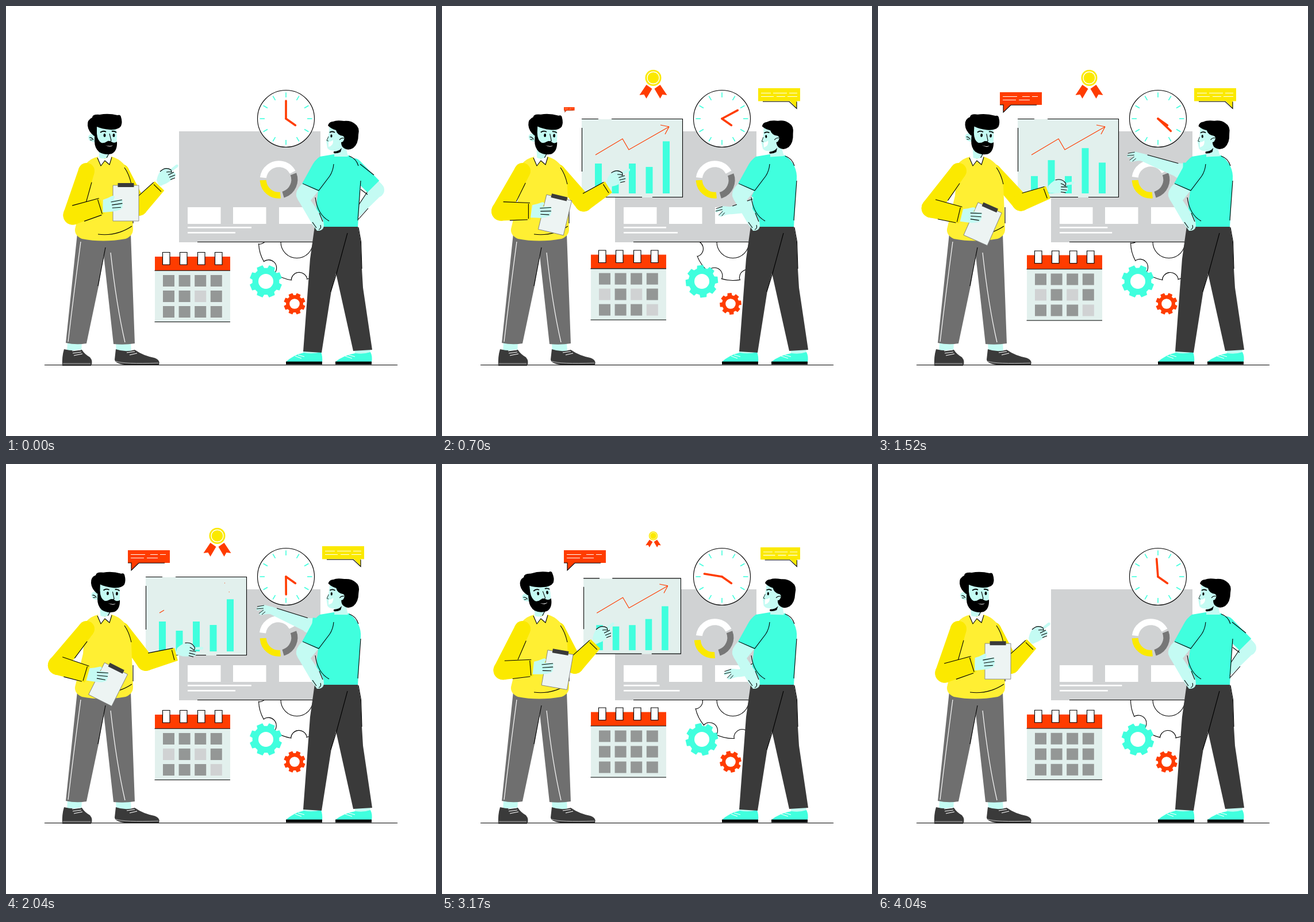
Recreate the animation shown at these times as an HTML page with a canvas. Size 748 by 748 pixels, loop 4090 ms.

```html
<!DOCTYPE html>
<html lang="en">
<head>
<meta charset="utf-8">
<title>Planning meeting</title>
<style>
html, body { margin: 0; width: 100%; height: 100%; overflow: hidden; background: #fff; }
canvas { display: block; width: 748px; height: 748px; }
</style>
</head>
<body>
<canvas id="stage" width="748" height="748"></canvas>
<script>
const ctx = document.getElementById('stage').getContext('2d');
const LOOP = 4090, TAU = Math.PI * 2, RAD = Math.PI / 180;
const CYAN = '#40ffde', SKIN = '#c4fbf3', RED = '#ff3c00', YELLOW = '#fbe900',
  SWEATER = '#ffef33', PAPER = '#e2f0ed', DARK = '#3a3a3a', GREY = '#6f6f6f', BOARD = '#d0d2d3';

const lerp = (a, b, p) => a + (b - a) * p;
const mix = (a, b, p) => [lerp(a[0], b[0], p), lerp(a[1], b[1], p)];
const ramp = (t, a, b) => {
  const p = Math.min(1, Math.max(0, (t - a) / (b - a)));
  return 0.5 - 0.5 * Math.cos(Math.PI * p);
};
const hump = (t, a, b) => t > a && t < b ? Math.sin(Math.PI * (t - a) / (b - a)) : 0;
const swing = t => 1 - Math.abs((t / LOOP * 2) % 1 * 2 - 1);

// Monotone cubic through rows of [time, ...values]
function key(t, rows) {
  let i = 0;
  while (i < rows.length - 2 && t >= rows[i + 1][0]) i++;
  const a = rows[i], b = rows[i + 1], span = b[0] - a[0], p = (t - a[0]) / span;
  const slope = (j, c) => {
    if (j < 1 || j > rows.length - 2) return 0;
    const [l, m, r] = [rows[j - 1], rows[j], rows[j + 1]];
    if ((m[c] - l[c]) * (r[c] - m[c]) <= 0) return 0;
    return (r[c] - l[c]) / (r[0] - l[0]);
  };
  return a.slice(1).map((v, k) => {
    const c = k + 1, q = p * p, u = q * p;
    return v * (2 * u - 3 * q + 1) + b[c] * (3 * q - 2 * u) +
      span * (slope(i, c) * (u - 2 * q + p) + slope(i + 1, c) * (u - q));
  });
}

function fill(d, color) {
  ctx.fillStyle = color;
  ctx.fill(new Path2D(d));
}
function line(d, color = '#000', width = 1.1) {
  ctx.strokeStyle = color;
  ctx.lineWidth = width;
  ctx.stroke(new Path2D(d));
}
function rect(x, y, w, h, color) {
  ctx.fillStyle = color;
  ctx.fillRect(x, y, w, h);
}
function disc(x, y, r, color) {
  ctx.fillStyle = color;
  ctx.beginPath();
  ctx.arc(x, y, r, 0, TAU);
  ctx.fill();
}
function oval(x, y, rx, ry) {
  ctx.fillStyle = '#000';
  ctx.beginPath();
  ctx.ellipse(x, y, rx, ry, 0, 0, TAU);
  ctx.fill();
}
// Places the drawing's point (px, py) at (x, y)
function group(draw, x, y, scale = 1, turn = 0, px = x, py = y) {
  if (scale <= 0.01) return;
  ctx.save();
  ctx.translate(x, y);
  ctx.rotate(turn);
  ctx.scale(scale, scale);
  ctx.translate(-px, -py);
  draw();
  ctx.restore();
}

// Limbs: a tapered capsule and lines along or across it
function offset(a, b, ra, rb, p, side) {
  const dx = b[0] - a[0], dy = b[1] - a[1], len = Math.hypot(dx, dy) || 1;
  const r = lerp(ra, rb, p) * side, m = mix(a, b, p);
  return [m[0] + dy / len * r, m[1] - dx / len * r];
}
function limb(a, b, ra, rb, color, flat) {
  const pts = [[0, 1], [1, 1], [1, -1], [0, -1]].map(([p, s]) => offset(a, b, ra, rb, p, s));
  fill('M' + pts.map(p => p.join()).join('L') + 'Z', color);
  disc(a[0], a[1], ra, color);
  if (!flat) disc(b[0], b[1], rb, color);
}
function edge(a, b, ra, rb, from, to, side = 1) {
  line('M' + offset(a, b, ra, rb, from, side) + 'L' + offset(a, b, ra, rb, to, side));
}
function cuff(a, b, r, p) {
  line('M' + offset(a, b, r, r, p, 0.9) + 'L' + offset(a, b, r, r, p, -0.9));
}

function cog(x, y, root, tip, hole, turn, color) {
  ctx.fillStyle = color;
  ctx.beginPath();
  for (let i = 0; i < 8; i++) {
    const a = turn + i * TAU / 8;
    [[-0.27, root], [-0.19, tip], [0.19, tip], [0.27, root]].forEach(([d, r]) =>
      ctx.lineTo(x + r * Math.cos(a + d), y + r * Math.sin(a + d)));
  }
  ctx.closePath();
  ctx.fill();
  disc(x, y, hole, '#fff');
}

function gears(t) {
  const cx = 506, cy = 411, r = 66.5, step = TAU / 7, turn = 138 * RAD - 8 * step * t / LOOP;
  ctx.strokeStyle = '#000';
  ctx.lineWidth = 1.1;
  ctx.beginPath();
  for (let i = 0; i < 7; i++) {
    const a = turn + i * step;
    ctx.arc(cx + r * Math.cos(a), cy + r * Math.sin(a), 14, a - 1.68, a + 1.68, true);
    ctx.arc(cx, cy, r, a + 0.21, a + step - 0.21);
  }
  ctx.closePath();
  ctx.stroke();
  ctx.beginPath();
  ctx.arc(cx, cy - 0.5, 28, 0, TAU);
  ctx.stroke();
  const spin = TAU * t / LOOP + TAU / 16;
  cog(452, 479, 23.5, 28.5, 13, spin, CYAN);
  cog(502, 518, 15, 19, 8.8, spin, RED);
}

function board(t) {
  rect(301, 218, 246, 193, BOARD);
  line('M333,410.5H541');
  [316, 395, 475].forEach(x => rect(x, 350, 57.5, 29, '#fff'));
  const s = swing(t);
  rect(316, 384, 111 - 54 * s, 2.6, '#fff');
  rect(316, 393, 83 + 16 * s, 2.6, '#fff');
  const part = (from, to, push, color) => {
    const mid = (from + to) / 2 * RAD;
    ctx.strokeStyle = color;
    ctx.lineWidth = 11;
    ctx.beginPath();
    ctx.arc(474.5 + push * Math.cos(mid), 302 + push * Math.sin(mid), 27.3, from * RAD, to * RAD);
    ctx.stroke();
  };
  part(187, 332, 5 * hump(t, 1450, 2600), '#fff');
  part(-21, 74, 3 * hump(t, 150, 950), '#777');
  part(84, 178, 4.5 * hump(t, 2800, 3700), YELLOW);
}

function clock(t) {
  const x = 487, y = 196;
  disc(x, y, 49.5, '#fff');
  line('M536.5,196A49.5,49.5 0 1 1 437.5,196A49.5,49.5 0 1 1 536.5,196');
  const ray = (a, from, to, color, w) => {
    const s = Math.sin(a), c = -Math.cos(a);
    line(`M${x + s * from},${y + c * from}L${x + s * to},${y + c * to}`, color, w);
  };
  for (let i = 0; i < 12; i++) ray(i * TAU / 12, 37, 45.5, CYAN, 1.6);
  ctx.lineCap = 'round';
  ray(125 * RAD, 0, 20, RED, 3.6);
  ray(TAU * t / LOOP, 0, 31, RED, 3.6);
  ctx.lineCap = 'butt';
}

function calendar(t) {
  const light = { 6: t < 2950, 4: t > 700 && t < 2400, 11: t > 700 && t < 2400 };
  group(() => {
    rect(259, 460, 131, 90, PAPER);
    rect(259, 436, 131, 24, RED);
    line('M258.5,460.3H390M258.5,549.5H390');
    [272.5, 302.5, 333.5, 363.5].forEach(x => {
      rect(x, 428.5, 12.5, 21.5, '#fff');
      line(`M${x},428.5h12.5v21.5h-12.5z`);
    });
    for (let i = 0; i < 12; i++)
      rect(273 + i % 4 * 27.6, 468 + Math.floor(i / 4) * 27, 20, 20, light[i] ? BOARD : '#949796');
  }, 0, -5 * swing(t), 1, 0, 0, 0);
}

function trim(d, len, p) {
  if (p <= 0.005) return;
  ctx.setLineDash([len * p, 999]);
  line(d, RED, 1.2);
  ctx.setLineDash([]);
}
function chart(t) {
  const scale = ramp(t, 40, 440) - ramp(t, 3123, 3523);
  group(() => {
    rect(243, 197, 176, 136, PAPER);
    line('M243,196.5H272M295,196.5H418.5V332.5H366M348,332.5H262M243.5,212V288');
    const h = 39.5 + 12.5 * Math.cos(3 * TAU * (t / LOOP - 0.5));
    [h, 88 - h, h, 124 - 1.5 * h, 1.7 * h + 2.3].forEach((v, i) =>
      rect(266 + i * 29.5, 326 - v, 12, v, CYAN));
    const p = ramp(t, 60, 560) - ramp(t, 1560, 2130) + ramp(t, 2130, 2600);
    trim('M267,259L314,231L325,250L395,210', 157.5, p);
    trim('M380,207L395,210', 15.5, p);
    trim('M388,223L395,210', 15, p);
  }, 331, 265, scale);
}

function extras(t) {
  const medal = 1 - ramp(t, 2980, 3390), grow = ramp(t, 390, 700);
  group(() => {
    const splay = 4 * RAD * hump(t, 700, 1500);
    [1, -1].forEach(side => {
      ctx.save();
      ctx.translate(367.5, 125);
      ctx.scale(side * grow, grow);
      ctx.rotate(-splay);
      fill('M2,19L12,12L24,30L16,29L12,36Z', RED);
      ctx.restore();
    });
    group(() => {
      disc(367.5, 125, 14, YELLOW);
      line('M378,125a10.5,10.5 0 1 1 -21,0a10.5,10.5 0 1 1 21,0', '#fff', 1.3);
    }, 367.5, 125, ramp(t, 130, 420));
  }, 367.5, 125, medal);

  group(() => {
    fill('M550,143H623V165.5H617V178L605,165.5H550Z', YELLOW);
    line('M558,166.3H604L617,178.5V166.5');
    line('M555,151.5h17m4,0h24m4,0h14M555,157.5h22m5,0h15m4,0h17', '#fff', 1.2);
  }, 623, 178, ramp(t, 40, 455) - ramp(t, 3110, 3510));

  group(() => {
    fill('M212,150H285V172H231L218,185V172H212Z', RED);
    line('M212,172H218V185L231,172.3H276');
    line('M217,157.5h25m9,0h13m4,0h10M217,163.5h23m5,0h19', '#fff', 1.2);
  }, 212, 185, ramp(t, 600, 900) - ramp(t, 3230, 3600) + 0.04 * hump(t, 880, 1250));
}

function leftHead(t) {
  const [shift, tilt] = key(t, [[0, 0, 0], [350, 3, 0.02], [1040, 8.5, 0.045], [2040, 4.5, 0.03],
    [2700, -0.5, -0.07], [3170, -1, -0.11], [4040, 0, 0], [4090, 0, 0]]);
  group(() => {
    fill('M161,240H181L178,262Q172,268 162,264Z', SKIN);
    line('M180,255L175,264');
  }, shift / 2, 0, 1, 0, 0, 0);
  group(() => {
    fill('M155,208L191,208Q194,225 192,243Q180,252 160,242L154,237Q143,236 143,228Q144,221 155,224Z', SKIN);
    line('M145,229Q149,228 152,233M146,233L150,233');
    fill('M154,221L158,222Q159,234 166,238Q171,239 175,236Q180,233 185,237Q189,239 193,236Q194,252 184,257Q172,260 162,254Q154,247 154,235Z', '#000');
    fill('M173,242Q181,245 186,242Q182,247 173,242Z', '#fff');
    fill('M142,208Q141,198 150,194Q150,188 163,189Q178,186 194,190Q199,188 200,193Q203,202 200,209Q195,216 180,215Q167,214 158,210L158,225L153,226Q143,218 142,208Z', '#000');
    oval(171.5, 225, 1.9, 3);
    oval(187.5, 225, 1.9, 3);
    line('M164,220Q169,216 174,219M184,218Q189,217 192,220', '#000', 1.8);
    line('M180,222L183,234Q181,237 177,235');
  }, 172 + shift, 255, 1, tilt, 172, 255);
}

function leftMan(t) {
  fill('M107,585H132L131,602H106ZM191,585H217L218,602H192Z', SKIN);
  fill('M101,597Q117,601 132,598Q137,606 146,611Q152,618 148,626H98Q97,610 101,597ZM191,597Q208,603 224,598Q238,608 258,612Q269,616 266,624H206Q190,622 189,615Z', DARK);
  line('M115,600L130,598M116,604L131,602M118,608L133,605M210,603L224,601M215,607L228,604', '#fff');
  line('M99,622H147M191,618Q205,623 265,621', '#ddd', 0.8);
  fill('M124,396L104,586Q122,590 140,587L161,487L170,434L187,588Q206,590 224,587L217,396Z', GREY);
  line('M173,420L160,487');
  line('M130,410Q118,500 108,584M182,429Q192,520 207,585', '#fff', 1.2);

  // Pointing arm, torso, then the clipboard arm
  const [ex, ey, wx, wy, turn] = key(t, [
    [0, 231, 350, 267, 313, 0], [350, 238, 347, 278, 315, 2], [1040, 251, 340, 296, 316, 16],
    [2040, 243, 345, 296, 331, 36], [2700, 234, 350, 270, 312, 0], [3170, 231, 350, 267, 313, 0],
    [4090, 231, 350, 267, 313, 0]]);
  const s1 = [201, 288], e1 = [ex, ey], w1 = [wx, wy];
  limb(s1, e1, 13, 15, YELLOW);
  group(() => {
    fill('M262,303Q265,288 274,283Q281,280 286,284L296,276Q301,275 299,280L288,288Q297,290 295,296L287,303Q280,309 273,311Q266,317 262,303Z', SKIN);
    line('M268,288Q277,279 287,285L288,289Q283,288 279,289M282,294L292,289M284,298L294,294M286,302L294,299');
  }, wx, wy, 1, turn * RAD, 267, 313);
  limb(e1, w1, 15, 11.5, YELLOW, true);
  edge(e1, w1, 15, 11.5, 0.15, 0.95);
  cuff(e1, w1, 10, 0.9);

  fill('M161,262Q146,265 138,276L134,330L120,388Q119,399 132,405Q168,412 208,405Q221,400 221,388L218,312Q213,285 204,274Q195,265 184,262Z', SWEATER);
  line('M160,397Q192,401 219,383M206,281Q214,292 218,310M221,350V378');
  fill('M159,264L163,260L172,266L181,260L184,264L180,276L172,269L165,278Z', '#fff');
  line('M159,264L165,278L172,269L180,276L184,263');

  const [q] = key(t, [[0, 0], [350, 0.23], [1040, 0.73], [1650, 0.91], [2240, 1],
    [2700, 0.77], [3170, 0.37], [3960, 0.03], [4090, 0]]);
  const s = [140, 287], e = mix([116, 364], [89, 350], q), w = mix([167, 348], [141, 366], q);
  limb(s, e, 14, 16.5, YELLOW);
  edge(s, e, 14, 16.5, 0.2, 0.65);
  limb(e, w, 16.5, 14.5, YELLOW, true);
  edge(e, w, 16.5, 14.5, 0.08, 0.98);
  edge(e, w, 16.5, 14.5, 0.3, 0.9, -1);
  cuff(e, w, 14.5, 0.93);

  group(() => {
    rect(-22.5, -31, 45, 62, '#edf4f3');
    line('M-22.5,-31H22.5V31H-22.5Z', '#777', 0.8);
    rect(-14, -35, 28, 7, DARK);
  }, lerp(208.5, 177, q ** 1.4), lerp(343, 384, q), 1, 27 * q * RAD, 0, 0);
  group(() => {
    fill('M0,-11Q8,-14 14,-18Q19,-21 20,-17L18,-12L32,-14Q36,-12 33,-9Q37,-6 34,-3Q36,1 32,3Q24,8 14,9L1,11Z', SKIN);
    line('M14,-8L33,-13M16,-3L34,-7M17,2L32,0');
  }, w[0] + 1, w[1], 1, (4 + 14 * q) * RAD, 0, 0);
  leftHead(t);
}

function rightHead(t) {
  const [h] = key(t, [[0, 0], [350, -1.5], [1040, -4.5], [2040, 0.5], [2700, 2], [3170, 2], [4040, 0], [4090, 0]]);
  group(() => {
    fill('M572,240L590,240L595,262H571Z', SKIN);
    fill('M563,207L561,226L557,234L559,247Q563,253 574,251Q584,247 588,236L582,210Z', SKIN);
    fill('M570,253Q579,253 584,247L582,254Q576,257 570,256Z', '#000');
    fill('M561,236Q566,236 569,233Q570,243 561,245Z', '#fff');
    oval(566, 226, 1.6, 2.8);
    line('M563,220Q567,217 572,220', '#000', 1.8);
    line('M561,227L558,234L561,235', '#000', 0.8);
    fill('M560,208Q562,201 569,201Q575,198 588,200Q600,199 607,205Q616,211 613,224Q613,240 604,247Q596,252 589,248Q583,245 583,237L585,226Q576,224 574,216Q566,214 560,208Z', '#000');
    fill('M579,231Q580,225 586,226Q591,229 586,236Q582,238 579,236Z', SKIN);
    line('M580,233Q583,229 588,230');
  }, 580, 262, 1, h * 0.018);
}

function rightMan(t) {
  // Far arm: hand on hip, then reaching round to the board
  const [sx, sy, ex, ey, wx, wy] = key(t, [
    [0, 605, 280, 645, 320, 612, 360], [350, 598, 285, 603, 325, 590, 350],
    [620, 580, 290, 555, 350, 516, 362], [1040, 565, 290, 528, 304, 467, 289],
    [2040, 560, 285, 527, 281, 462, 255], [2700, 565, 290, 528, 302, 464, 282],
    [3170, 580, 290, 560, 352, 517, 364], [3500, 598, 285, 603, 325, 590, 350],
    [3920, 605, 280, 645, 320, 612, 360], [4090, 605, 280, 645, 320, 612, 360]]);
  const s = [sx, sy], e = [ex, ey], w = [wx, wy];
  limb(s, e, 15, 13, SKIN);
  limb(e, w, 12, 6.5, SKIN);
  edge(e, w, 12, 6.5, 0.1, 0.9, -1);
  if (wx < 560) group(() => {
    fill('M3,-6L-13,-10Q-21,-9 -27,-3L-25,0L-14,-3L-22,5L-20,8L-8,6L4,6Z', SKIN);
    line('M-25,-7L-13,-9M-26,-3L-14,-4M-22,5L-14,-1M-17,7L-11,2', '#000', 0.9);
  }, wx, wy, 1, -0.15 * ramp(wy, 300, 350), 0, 0);
  limb(s, mix(s, e, 0.85), 15, 14.5, CYAN, true);
  if (ex > 630) line('M617,319L629,328M613,371L630,352M616,275L640,294');

  fill('M608,597H634L633,606H606ZM517,599H548V605H517Z', SKIN);
  fill('M487,619Q500,607 518,603Q533,606 548,602Q551,610 550,619ZM573,619Q588,607 608,604Q622,606 634,602Q638,610 636,619Z', CYAN);
  rect(487, 618.5, 63, 5, '#000');
  rect(573, 618.5, 63, 5, '#000');
  line('M503,609L514,613M508,607L519,610M590,609L602,613M596,607L607,610', '#fff');
  fill('M537,383L529,440L517,601L549,603L566,495L574,465L604,600L637,598L621,490L619,457L617,410L612,383Z', DARK);
  line('M594,395L575,465L565,497M613,385L617.5,410L619,457');

  fill('M570,258L546,262Q537,268 531,280L515,309L543,322L540,345V384H612L617,302Q619,277 597,260Z', CYAN);
  line('M570,275Q569,287 563,296L544,321L516,309');
  line('M597,261Q609,265 613,278M617,304L612,373');

  fill('M515,309Q503,321 505,331Q507,337 512,344L533,380L541,391Q551,392 553,383Q553,371 546,362L530,338L543,322Z', SKIN);
  line('M538,333Q542,363 562,374M533,376L540,386M544,389Q549,387 547,381M545,360L551,375');
  rightHead(t);
}

function draw(t) {
  rect(0, 0, 748, 748, '#fff');
  line('M67,624.5H681');
  gears(t);
  board(t);
  clock(t);
  calendar(t);
  chart(t);
  extras(t);
  leftMan(t);
  rightMan(t);
}

const start = performance.now();
function tick() {
  draw((performance.now() - start) % LOOP);
  requestAnimationFrame(tick);
}
tick();
</script>
</body>
</html>
```
